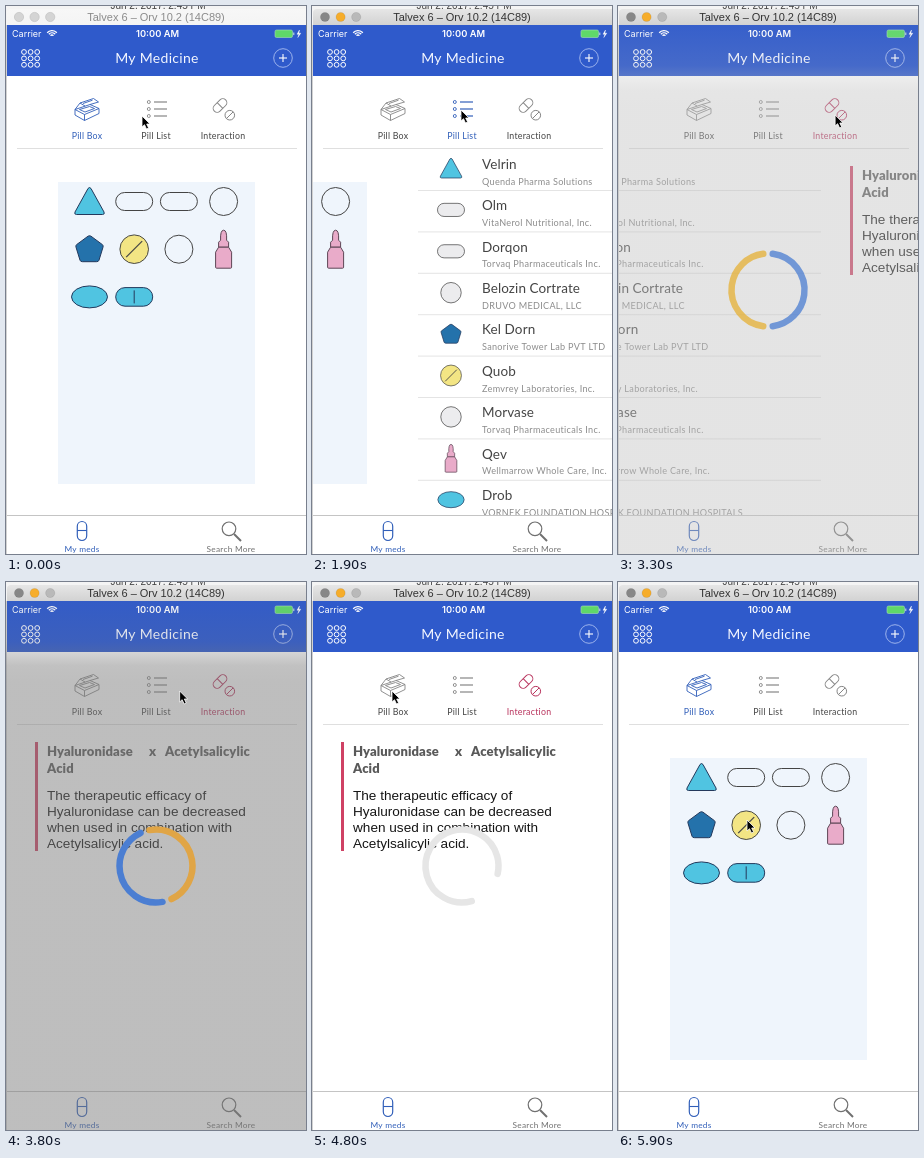
An HTML page with a canvas that plays this animation: 300x548 px, repeating every 6 s.

```html
<!DOCTYPE html>
<html lang="en">
<head>
<meta charset="utf-8">
<title>My Medicine</title>
<style>
  html, body { margin: 0; width: 100%; height: 100%; overflow: hidden; background: #fff; }
  canvas { display: block; width: 300px; height: 548px; }
</style>
</head>
<body>
<canvas id="stage"></canvas>
<script>
const W = 300, H = 548, LOOP = 6000, STEP = 100;
const canvas = document.getElementById('stage');
const ctx = canvas.getContext('2d');
const dpr = window.devicePixelRatio || 1;
canvas.width = W * dpr;
canvas.height = H * dpr;

const BLUE = '#2f5acb', TAB_BLUE = '#315fb9', RED = '#b8325c', GREY = '#444';
const INK = '#24395c', CYAN = '#50c4e1', PALE = '#ececee';
const LATO = 'Lato, sans-serif', INTER = 'Inter, sans-serif', SANS = '"Liberation Sans", Arial, sans-serif';

const rows = [
  ['triangle', 'Velrin', 'Quenda Pharma Solutions'],
  ['capsule', 'Olm', 'VitaNerol Nutritional, Inc.'],
  ['capsule', 'Dorqon', 'Torvaq Pharmaceuticals Inc.'],
  ['circle', 'Belozin Cortrate', 'DRUVO MEDICAL, LLC'],
  ['pentagon', 'Kel Dorn', 'Sanorive Tower Lab PVT LTD'],
  ['tablet', 'Quob', 'Zemvrey Laboratories, Inc.'],
  ['circle', 'Morvase', 'Torvaq Pharmaceuticals Inc.'],
  ['bottle', 'Qev', 'Wellmarrow Whole Care, Inc.'],
  ['ellipse', 'Drob', 'VORNEK FOUNDATION HOSPITALS']
];

// time, x, y of the pointer tip
const pointerPath = [
  [0, 136, 110], [900, 149, 104], [1900, 149, 104], [2500, 218, 109],
  [3500, 217, 109], [4300, 80, 109], [5100, 80, 109], [5800, 129, 238], [6000, 129, 238]
];

const clamp = v => Math.max(0, Math.min(1, v));
const ramp = (t, from, to) => clamp((t - from) / (to - from));
const mix = (a, b, p) => a + (b - a) * p;
const smooth = p => p * p * (3 - 2 * p);

function text(str, x, y, size, color, { font = LATO, weight = 400, align = 'left', spacing = 0 } = {}) {
  ctx.font = `${weight} ${size}px ${font}`;
  ctx.letterSpacing = spacing + 'px';
  ctx.textAlign = align;
  ctx.fillStyle = color;
  ctx.fillText(str, x, y);
}

function rect(x, y, w, h, color) {
  ctx.fillStyle = color;
  ctx.fillRect(x, y, w, h);
}

function shape(build, fill, stroke, width = 1) {
  ctx.beginPath();
  build();
  if (fill) { ctx.fillStyle = fill; ctx.fill(); }
  if (stroke) { ctx.strokeStyle = stroke; ctx.lineWidth = width; ctx.stroke(); }
}

const disc = (x, y, r, fill, stroke, width) => shape(() => ctx.arc(x, y, r, 0, 7), fill, stroke, width);
const line = (x1, y1, x2, y2, color, width) =>
  shape(() => { ctx.moveTo(x1, y1); ctx.lineTo(x2, y2); }, null, color, width);
const round = (x, y, w, h, r, fill, stroke, width) =>
  shape(() => ctx.roundRect(x, y, w, h, r), fill, stroke, width);

function path(d, color, width = 1, fill) {
  const p = new Path2D(d);
  if (fill) { ctx.fillStyle = fill; ctx.fill(p); }
  ctx.strokeStyle = color;
  ctx.lineWidth = width;
  ctx.stroke(p);
}

const pills = {
  triangle: () => path('M-1.5-13 Q0-15 1.5-13 L14.5 10.5 Q15.5 13 13 13 H-13 Q-15.5 13-14.5 10.5Z', INK, 1, CYAN),
  capsule: fill => round(-18.5, -9, 37, 18, 9, fill, '#444'),
  circle: fill => disc(0, 0, 14, fill, '#444'),
  pentagon: () => path('M-1.5-13 Q0-14 1.5-13 L13-4.5 Q14-3.5 13.5-2 L9.5 11 Q9 12.5 7 12.5 H-7 Q-9 12.5-9.5 11 L-13.5-2 Q-14-3.5-13-4.5Z', INK, 1, '#2472ab'),
  tablet: () => {
    disc(0, 0, 14.3, '#f3e584', '#4a4a45');
    line(-8, 8, 8, -8, '#444', 1.2);
  },
  bottle: () => {
    path('M-3-9 Q-3.5-19 0-19 Q3.5-19 3-9 L5-7 V-2 H-5 V-7Z', '#5d4656', 1, '#e9abc9');
    path('M-5-2 H5 L8 3 V18 Q8 19 7 19 H-7 Q-8 19-8 18 V3Z', '#5d4656', 1, '#e9abc9');
  },
  ellipse: () => shape(() => ctx.ellipse(0, 0, 18, 11, 0, 0, 7), CYAN, INK),
  scored: () => {
    round(-18.5, -9.3, 37, 18.6, 9.3, CYAN, INK);
    line(0, -6.5, 0, 6.5, INK, 1);
  }
};

function pill(kind, x, y, scale = 1, fill) {
  ctx.save();
  ctx.translate(x, y);
  ctx.scale(scale, scale);
  pills[kind](fill);
  ctx.restore();
}

function boxPage() {
  rect(52, 176, 197, 302, '#eff5fc');
  const grid = ['triangle', 'capsule', 'capsule', 'circle', 'pentagon', 'tablet', 'circle', 'bottle', 'ellipse', 'scored'];
  grid.forEach((kind, i) => pill(kind, 83.5 + (i % 4) * 44.7, 195.5 + Math.floor(i / 4) * 47.7));
}

function listPage() {
  rows.forEach(([kind, name, maker], i) => {
    const y = i * 41.4;
    pill(kind, 33, 162.5 + y, 0.73, PALE);
    text(name, 64, 162.8 + y, 13.5, '#444', { spacing: 0.1 });
    text(maker, 64, 178.6 + y, 9.1, '#8c8c8c', { spacing: 0.3 });
    line(0, 184.5 + y, 300, 184.5 + y, '#dedede', 0.8);
  });
}

function interactionPage() {
  rect(29, 160, 3, 109, '#cf4164');
  const bold = { weight: 900, spacing: 0.1 };
  text('Hyaluronidase', 41, 173.5, 13, '#595959', bold);
  text('x', 143, 173.5, 13, '#595959', bold);
  text('Acetylsalicylic', 159, 173.5, 13, '#595959', bold);
  text('Acid', 41, 191, 13, '#595959', bold);
  ['The therapeutic efficacy of', 'Hyaluronidase can be decreased', 'when used in combination with', 'Acetylsalicylic acid.']
    .forEach((s, i) => text(s, 41, 218 + i * 16, 13.6, '#151515', { font: SANS }));
}

const pages = [boxPage, listPage, interactionPage];

function windowBar(active) {
  rect(0, 0, W, 20, '#f4f4f4');
  text('Jun 2, 2017, 2:45 PM', 152, 2.5, 10, '#444', { font: SANS, align: 'center' });
  const shade = ctx.createLinearGradient(0, 3, 0, 19);
  shade.addColorStop(0, active ? '#e6e6e6' : '#f7f7f7');
  shade.addColorStop(1, active ? '#d2d2d2' : '#f4f4f4');
  round(1, 3, 300, 18, [4, 0, 0, 0], shade);
  const lights = active ? ['#878787', '#f6ad2b', '#b9b9b9'] : ['#d4d4d4', '#d4d4d4', '#d4d4d4'];
  lights.forEach((c, i) => disc(13 + i * 15.6, 11, 4.6, c, active ? 'rgba(0,0,0,.12)' : '#c2c2c2', 0.7));
  text('Talvex 6 – Orv 10.2 (14C89)', 150, 14.5, 11, active ? '#333' : '#8b8b8b', { font: SANS, align: 'center' });
}

function header() {
  rect(1, 19, 299, 51, BLUE);
  text('Carrier', 6, 31, 9, '#fff', { font: INTER });
  for (const r of [2, 4.2, 6.4])
    shape(() => ctx.arc(46, 31, r, -Math.PI * 0.77, -Math.PI * 0.23), null, '#fff', 1.3);
  text('10:00 AM', 151.5, 31, 9.3, '#fff', { font: INTER, weight: 600, align: 'center' });
  round(269, 24, 17.5, 7.5, 1.5, '#5fd869', '#a8dcb8', 0.6);
  rect(287.3, 26.5, 1, 2.6, '#cfe8dc');
  path('M293.5 24 L291 28.2 H293 L291.8 31.5 L294.8 27.2 H292.8Z', '#fff', 0.4, '#fff');

  for (let i = 0; i < 9; i++)
    disc(18 + (i % 3) * 6.6, 46 + Math.floor(i / 3) * 6.4, 2.4, null, '#fff', 1);
  text('My Medicine', 151, 57, 14, '#f4f7ff', { align: 'center', spacing: 0.3 });
  disc(277, 52, 9.3, null, '#a9bdf0', 0.9);
  line(273, 52, 281, 52, '#fff', 1.1);
  line(277, 48, 277, 56, '#fff', 1.1);
}

const tabIcons = [
  c => path('M69 103.5 L78.5 108.5 L93 102.5 L84 98.5Z M69 103.5 V109 L78.5 114.5 L93 107.5 V102.5 M78.5 108.5 V114.5 M69 103.5 L74 97 L87.5 92.5 L92.5 96 L84 98.5 M74 97 L79 100 M77 97.5 L86.5 94.2 M73.5 103.5 L83.5 100.5 L88.5 102.5 L79 106Z', c, 0.9),
  c => [96, 103, 110].forEach(y => {
    disc(142.8, y, 1.5, null, c, 0.9);
    line(148, y, 161, y, c, 1.2);
  }),
  c => {
    ctx.save();
    ctx.translate(214, 99.5);
    ctx.rotate(-Math.PI / 4);
    round(-8, -4, 16, 8, 4, null, c, 1);
    line(0, -4, 0, 4, c, 1);
    ctx.restore();
    disc(223.8, 109.2, 4.8, '#fff', c, 1);
    line(220.4, 112.6, 227.2, 105.8, c, 1);
  }
];

function tabs(selected) {
  ['Pill Box', 'Pill List', 'Interaction'].forEach((label, i) => {
    const on = i === selected, accent = i === 2 ? RED : TAB_BLUE;
    tabIcons[i](on ? accent : '#858585');
    text(label, [81, 150, 217][i], 133, 8.8, on ? accent : GREY, { align: 'center', spacing: 0.25 });
  });
  line(11, 142.5, 291, 142.5, '#dcdcdc', 0.9);
}

function bottomBar() {
  rect(1, 510, 299, 38, '#fff');
  line(1, 509.5, 300, 509.5, '#c4c4c4', 1);
  round(71.3, 515.5, 9.4, 19, 4.7, null, TAB_BLUE, 1.2);
  line(71.3, 524.5, 80.7, 524.5, TAB_BLUE, 1.1);
  text('My meds', 76, 546, 8.3, TAB_BLUE, { align: 'center', spacing: 0.25 });
  disc(223, 522.8, 6.8, null, '#707070', 1.2);
  line(228, 528, 235, 535, '#707070', 2);
  text('Search More', 225, 546, 8.3, '#707070', { align: 'center', spacing: 0.25 });
}

function loader(t) {
  if (t < 3200 || t >= 4900) return;
  const fadeIn = ramp(t, 3150, 3550), fadeOut = 1 - ramp(t, 4600, 4800);
  const tone = Math.round(mix(235, 122, fadeIn));
  const alpha = 0.49 * ramp(t, 3150, 3320) * fadeOut;
  const veil = ctx.createLinearGradient(0, 19, 0, 100);
  [[0, 0.12], [0.5, 0.35], [0.66, 0.7], [0.8, 0.95], [1, 1]].forEach(([at, k]) =>
    veil.addColorStop(at, `rgba(${tone},${tone},${tone},${alpha * k})`));
  rect(0, 19, W, H - 19, veil);

  ctx.save();
  ctx.translate(150, 284);
  ctx.lineCap = 'round';
  if (t >= 4800) {
    shape(() => ctx.arc(0, 0, 36.5, 1.3, 6.5), null, '#e6e6e6', 6.5);
  } else {
    ctx.globalAlpha = mix(0.75, 1, ramp(t, 3300, 3600)) * mix(0.2, 1, fadeOut);
    // a little over one turn each 1.1 s
    ctx.rotate((t - 3300) * 422 / 1300 * Math.PI / 180);
    const half = Math.PI / 2, gap = 0.13;
    shape(() => ctx.arc(0, 0, 36.5, half + gap, 3 * half - gap), null, t < 3400 ? '#e6b034' : '#e0a546', 6.5);
    shape(() => ctx.arc(0, 0, 36.5, -half + gap, half - gap), null, '#4b7ed2', 6.5);
  }
  ctx.restore();
}

function pointer(t) {
  const i = pointerPath.findIndex(k => k[0] > t);
  const [t0, x0, y0] = pointerPath[i - 1], [t1, x1, y1] = pointerPath[i];
  const p = smooth(ramp(t, t0, t1));
  ctx.save();
  ctx.translate(mix(x0, x1, p), mix(y0, y1, p));
  path('M0 0 V11 L2.5 8.7 L4.5 13 L6.6 12 L4.7 8 H8Z', '#fff', 0.8, '#000');
  ctx.restore();
}

function draw(t) {
  ctx.setTransform(dpr, 0, 0, dpr, 0, 0);
  ctx.lineJoin = 'round';
  rect(0, 0, W, H, '#fff');

  const slides = [[1700, 0, 1, 1], [3200, 1, 2, 1], [5000, 2, 0, -1]];
  const [start, from, to, dir] = slides.filter(s => t >= s[0]).pop() || [-1000, 0, 0, 1];
  const p = ramp(t, start, start + 310);
  [[from, -p * dir], [to, (1 - p) * dir]].forEach(([page, offset]) => {
    if (Math.abs(offset) >= 1) return;
    ctx.save();
    ctx.translate(Math.round(offset * W), 0);
    pages[page]();
    ctx.restore();
  });

  tabs(to);
  bottomBar();
  windowBar(t >= 1700);
  header();
  rect(0, 19, 1, H - 19, '#d2d2d2');
  loader(t);
  pointer(t);
}

function tick(now) {
  draw(Math.floor((now % LOOP) / STEP) * STEP);
  requestAnimationFrame(tick);
}
draw(0);
requestAnimationFrame(tick);
</script>
</body>
</html>
```
